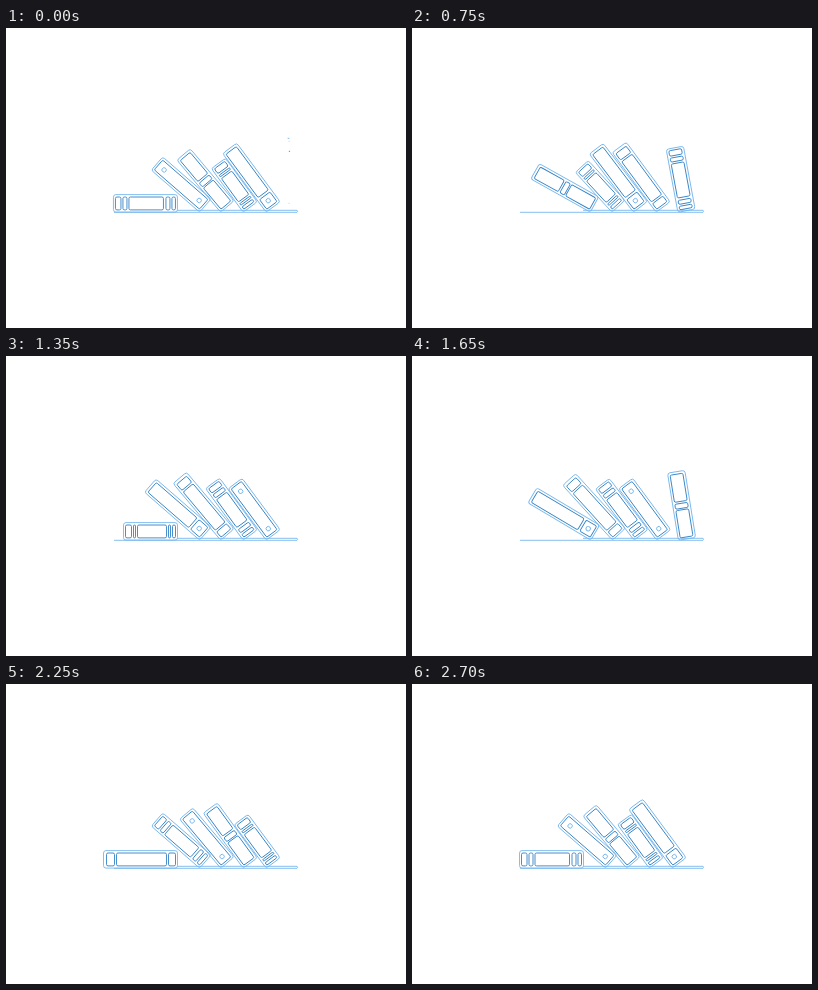
Write an HTML page with a canvas that moves like this. It is 400x300 px and loops after 2730 ms.

```html
<!DOCTYPE html>
<html lang="en">
<head>
<meta charset="utf-8">
<title>Falling books loader</title>
<style>
  html, body { margin: 0; width: 100%; height: 100%; overflow: hidden; background: #fff; }
  canvas { display: block; }
</style>
</head>
<body>
<canvas id="stage" width="400" height="300"></canvas>
<script>
const ctx = document.getElementById('stage').getContext('2d');
const LOOP = 2730, BASE = 184.3, WIDTH = 17.5;
const LIGHT = '#78b7ee', DARK = '#3583c6';

// Panels and rings are measured from the top of each spine.
const books = [
  { size: 64, panels: [[2, 7.5], [9.5, 13.5], [15.5, 50], [52.5, 56.5], [58.5, 62]], rings: [] },
  { size: 64, panels: [[2, 62]], rings: [9.5, 56] },
  { size: 68, panels: [[2.5, 30], [32, 37], [38.5, 66]], rings: [] },
  { size: 54, panels: [[2, 8], [10, 12], [14, 43], [45, 47], [49, 52]], rings: [] },
  { size: 73, panels: [[2.5, 56.5], [59, 71]], rings: [65] },
  { size: 74, panels: [[3, 11], [13, 63], [65, 72]], rings: [] }
];

// Resting places from the flat book to the upright newcomer.
const slots = [
  { x: 171.5, angle: 90 },
  { x: 193.5, angle: 49 },
  { x: 214.5, angle: 40 },
  { x: 237, angle: 36 },
  { x: 260, angle: 36.5 },
  { x: 279, angle: 0 }
];

const clamp = v => Math.max(0, Math.min(1, v));
const mix = (a, b, k) => a + (b - a) * k;

function strokePart(length, part, color) {
  ctx.setLineDash(part < 1 ? [length * part, length] : []);
  ctx.strokeStyle = color;
  ctx.stroke();
}

function box(x, y, w, h, r, part, color) {
  r = Math.min(r, w / 2, h / 2);
  ctx.beginPath();
  ctx.roundRect(x, y, w, h, r);
  strokePart(2 * (w + h) - (8 - 2 * Math.PI) * r, part, color);
}

function drawBook(book, x, angle, part) {
  if (part <= 0) return;
  ctx.save();
  ctx.translate(x, BASE);
  ctx.rotate(-angle * Math.PI / 180);
  ctx.lineWidth = 0.9;
  box(0.2, -book.size, WIDTH, book.size, 2.5, part, LIGHT);
  for (const [from, to] of book.panels) {
    box(2.4, from - book.size, WIDTH - 4.6, to - from, 1.5, part, DARK);
  }
  for (const y of book.rings) {
    ctx.beginPath();
    ctx.arc(WIDTH / 2, y - book.size, 2.2, 0, 2 * Math.PI);
    strokePart(4.4 * Math.PI, part, LIGHT);
  }
  ctx.restore();
}

function drawShelf() {
  ctx.setLineDash([]);
  ctx.lineWidth = 0.9;
  ctx.strokeStyle = LIGHT;
  ctx.beginPath();
  ctx.moveTo(171, 182.3);
  ctx.lineTo(291, 182.3);
  ctx.quadraticCurveTo(292.3, 183.3, 291, BASE);
  ctx.lineTo(108, BASE);
  ctx.stroke();
}

function render(time) {
  const steps = (time % LOOP) / LOOP * books.length;
  const first = Math.floor(steps);
  const phase = steps - first;
  const slide = clamp(phase / 0.93);
  const fall = clamp((slide - 0.35) / 0.65) ** 2;

  ctx.fillStyle = '#fff';
  ctx.fillRect(0, 0, 400, 300);
  drawShelf();

  slots.forEach((slot, i) => {
    const next = slots[i - 1] || { x: slot.x - 22, angle: 90 };
    let part = 1;
    if (i === 0) part = 1 - clamp(phase / 0.45) ** 1.4;
    if (i === slots.length - 1) part = clamp(phase / 0.22);
    drawBook(books[(first + i) % books.length],
      mix(slot.x, next.x, slide), mix(slot.angle, next.angle, fall), part);
  });
}

const start = performance.now();
function tick() {
  render(performance.now() - start);
  requestAnimationFrame(tick);
}
tick();
</script>
</body>
</html>
```
